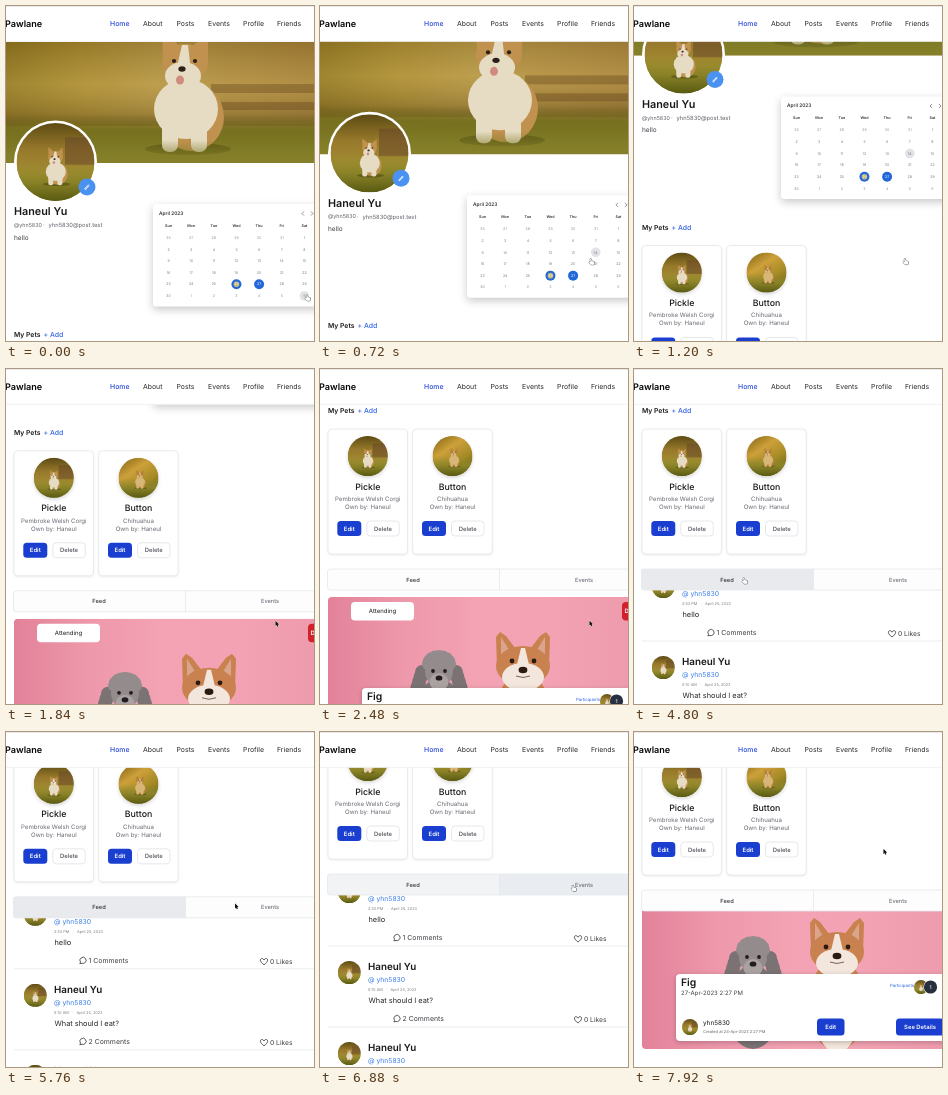
Animation, 308 px wide and 335 px high, one loop 8000 ms. Source, as an HTML page with a canvas:

```html
<!DOCTYPE html>
<html lang="en">
<head>
<meta charset="utf-8">
<title>Pet profile</title>
<style>
html, body { margin: 0; width: 100%; height: 100%; overflow: hidden; background: #fff; }
canvas { display: block; width: 308px; height: 335px; }
</style>
</head>
<body>
<canvas id="stage"></canvas>
<script>
const W = 308, H = 335, LOOP = 8000, STEP = 80;
const canvas = document.getElementById('stage');
const c = canvas.getContext('2d');
const dpr = Math.max(1, window.devicePixelRatio || 1);
canvas.width = W * dpr;
canvas.height = H * dpr;
c.textRendering = 'geometricPrecision';

const INK = '#18181b', GREY = '#5f6168', LINE = '#e5e7eb', BLUE = '#1a3fd0', LINK = '#2f62e8';
const USER = 'Haneul Yu', HANDLE = 'yhn5830';

// Eased value of [time, value] stops.
function track(t, stops) {
  if (t <= stops[0][0]) return stops[0][1];
  for (let i = 1; i < stops.length; i++) {
    const [t0, a] = stops[i - 1], [t1, b] = stops[i];
    if (t < t1) {
      const u = (t - t0) / (t1 - t0);
      return a + (b - a) * u * u * (3 - 2 * u);
    }
  }
  return stops[stops.length - 1][1];
}

function text(s, x, y, size, color = INK, weight = 400, align = 'left') {
  c.font = `${weight} ${size}px Inter, "Open Sans", sans-serif`;
  c.textAlign = align;
  c.textBaseline = 'middle';
  c.fillStyle = color;
  c.fillText(s, x, y);
}

function box(x, y, w, h, r, fill, stroke) {
  c.beginPath();
  c.roundRect(x, y, w, h, r);
  if (fill) { c.fillStyle = fill; c.fill(); }
  if (stroke) { c.strokeStyle = stroke; c.lineWidth = 0.8; c.stroke(); }
}

function shadowed(blur, dy, alpha, draw) {
  c.save();
  c.shadowColor = `rgba(0,0,0,${alpha})`;
  c.shadowBlur = blur * dpr;
  c.shadowOffsetY = dy * dpr;
  draw();
  c.restore();
}

function oval(x, y, rx, ry, fill, turn = 0) {
  c.beginPath();
  c.ellipse(x, y, rx, ry, turn, 0, Math.PI * 2);
  c.fillStyle = fill;
  c.fill();
}
const disc = (x, y, r, fill) => oval(x, y, r, r, fill);

function poly(fill, ...pts) {
  c.beginPath();
  pts.forEach(([x, y]) => c.lineTo(x, y));
  c.closePath();
  c.fillStyle = fill;
  c.fill();
}

function line(x0, y0, x1, y1, color, width = 0.8) {
  c.beginPath();
  c.moveTo(x0, y0);
  c.lineTo(x1, y1);
  c.strokeStyle = color;
  c.lineWidth = width;
  c.stroke();
}

function gradient(x0, y0, x1, y1, ...colors) {
  const g = c.createLinearGradient(x0, y0, x1, y1);
  colors.forEach((col, i) => g.addColorStop(i / (colors.length - 1), col));
  return g;
}

function clipped(path, draw) {
  c.save();
  c.beginPath();
  path();
  c.clip();
  draw();
  c.restore();
}

function button(label, x, y, w, h, solid) {
  box(x, y, w, h, 3.5, solid ? BLUE : '#fff', solid ? null : '#dfe1e6');
  text(label, x + w / 2, y + h / 2 + 0.3, 5.9, solid ? '#fff' : '#4b4d55', solid ? 600 : 500, 'center');
}

// Sitting dog, origin between its feet.
function sittingDog(x, y, s, coat = '#c0914f', chest = '#e6dcc4') {
  c.save();
  c.translate(x, y);
  c.scale(s, s);
  oval(6, -2, 43, 6, 'rgba(60,58,10,.45)');
  oval(10, -34, 32, 34, coat);
  oval(4, -42, 32, 30, chest);
  box(-20, -40, 16, 41, 7, chest);
  box(9, -40, 16, 41, 7, chest);
  poly(coat, [-19, -90], [-20, -120], [0, -103]);
  poly(coat, [8, -103], [26, -118], [26, -88]);
  oval(3, -88, 23, 19, coat);
  oval(1, -75, 18, 14, chest);
  poly(chest, [0, -106], [6, -106], [9, -80], [-6, -80]);
  disc(-8, -90, 2.1, '#2b2018');
  disc(13, -90, 2.1, '#2b2018');
  oval(0, -82, 3.6, 2.7, '#2b2018');
  oval(-2, -71, 4, 4.5, '#d08a80');
  c.restore();
}

function banner(y) {
  clipped(() => c.rect(0, y, W, 121), () => {
    c.fillStyle = gradient(0, 0, W, 0, '#8c7423', '#a88a35', '#b3954a', '#ad8a45', '#a5803f');
    c.fillRect(0, y, W, 121);
    c.fillStyle = gradient(0, y, 0, y + 84, 'rgba(110,84,12,.3)', 'rgba(215,185,90,.25)', 'rgba(95,72,20,.5)');
    c.fillRect(0, y, W, 84);
    c.fillStyle = 'rgba(92,62,24,.35)';
    c.fillRect(205, y + 42, 103, 9);
    c.fillRect(205, y + 60, 103, 8);
    c.fillStyle = gradient(0, y + 72, 0, y + 121, 'rgba(105,95,28,0)', '#77701f', '#7d7824', '#898329');
    c.fillRect(0, y + 72, W, 49);
    sittingDog(176, y + 109, 1);
    c.fillStyle = gradient(0, y + 98, 0, y + 121, 'rgba(125,120,36,0)', '#858029');
    c.fillRect(0, y + 98, W, 23);
  });
}

function photo(x, y, r, golden) {
  c.save();
  c.translate(x, y);
  c.scale(r / 41, r / 41);
  clipped(() => c.arc(0, 0, 41, 0, Math.PI * 2), () => {
    c.fillStyle = golden
      ? gradient(-30, -41, 25, 41, '#8a6a17', '#cda03a', '#a58a25', '#5c5a14')
      : gradient(0, -41, 0, 41, '#5d4b14', '#96782a', '#a58d35', '#6d6a17');
    c.fillRect(-41, -41, 82, 82);
    if (!golden) {
      c.fillStyle = 'rgba(105,72,40,.55)';
      c.fillRect(10, -26, 31, 29);
    }
    c.fillStyle = gradient(0, 0, 0, 41, 'rgba(150,140,40,0)', '#8b8328', '#595a12');
    c.fillRect(-41, 0, 82, 41);
    if (golden) sittingDog(2, 22, 0.32, '#b98238', '#d8b678');
    else sittingDog(-1, 24, 0.33);
  });
  c.restore();
}

function profile(y) {
  banner(36 + y);
  disc(49.5, 156 + y, 41.5, '#fff');
  photo(49.5, 156 + y, 39, false);
  disc(81, 181 + y, 8.5, '#4a92f2');
  line(78.8, 183.4 + y, 83, 179 + y, '#fff', 1.7);
  line(78.8, 183.4 + y, 83, 179 + y, '#4a92f2', 0.5);
  text(USER, 8, 206 + y, 10.8, INK, 600);
  text('@' + HANDLE, 8, 219.5 + y, 5.4, GREY);
  text('·', 37, 219.5 + y, 6, GREY);
  text(HANDLE + '@post.test', 42.5, 219.5 + y, 5.8, GREY);
  text('hello', 8, 232 + y, 6.5, '#3f4147');
}

function calendar(y, px, py) {
  shadowed(9, 3, 0.22, () => box(147, 198 + y, 175, 102.5, 3, '#fff'));
  text('April 2023', 153, 207.5 + y, 4.9, INK, 500);
  for (const [x, d] of [[297, -1], [306, 1]]) {
    line(x - d, 205.5 + y, x + d, 207.5 + y, '#444', 0.6);
    line(x + d, 207.5 + y, x - d, 209.5 + y, '#444', 0.6);
  }
  const left = 162.5, top = 231.7, dx = 22.65, dy = 11.65;
  const colX = i => left + i * dx, rowY = i => top + i * dy + y;
  ['Sun', 'Mon', 'Tue', 'Wed', 'Thu', 'Fri', 'Sat'].forEach((d, i) =>
    text(d, colX(i), 219.7 + y, 3.7, '#333', 600, 'center'));
  // The hovered day stays lit while the page scrolls beneath the pointer.
  disc(colX(Math.round((px - left) / dx)), rowY(Math.round((py - top) / dy)), 4.8, '#e2e3e6');
  for (let i = 0; i < 42; i++) {
    const x = colX(i % 7), ry = rowY(Math.floor(i / 7));
    const day = i < 6 ? 26 + i : i < 36 ? i - 5 : i - 35;
    const busy = i === 31 || i === 32;
    if (busy) {
      disc(x, ry, 5, '#2467d8');
      if (day === 26) disc(x, ry, 2.8, '#c2b775');
    }
    text(day, x, ry + 0.1, 3.6, busy ? '#fff' : i < 6 || i > 35 ? '#8d9096' : '#777a80', 400, 'center');
  }
}

function petCard(x, y, name, breed, golden) {
  shadowed(3, 1, 0.1, () => box(x, y, 79.5, 125, 4, '#fff'));
  box(x, y, 79.5, 125, 4, null, LINE);
  const mid = x + 39.8;
  shadowed(4, 2, 0.2, () => disc(mid, y + 27, 19.5, '#8a7a20'));
  photo(mid, y + 27, 20, golden);
  text(name, mid, y + 58, 8.8, INK, 500, 'center');
  text(breed, mid, y + 70, 6.1, '#686b73', 400, 'center');
  text('Own by: Haneul', mid, y + 78, 6.1, '#686b73', 400, 'center');
  button('Edit', x + 9.3, y + 92, 24, 15, true);
  button('Delete', x + 38.8, y + 92, 32.5, 15, false);
}

function pets(y) {
  text('My Pets', 8, 329 + y, 6.8, INK, 600);
  text('+ Add', 37.5, 329 + y, 6.9, LINK, 500);
  petCard(8, 347 + y, 'Pickle', 'Pembroke Welsh Corgi', false);
  petCard(92.7, 347 + y, 'Button', 'Chihuahua', true);
}

function poodle(x, y) {
  const fur = '#948b8c', dark = '#7b7274', light = '#aaa2a1';
  oval(x, y + 50, 27, 42, dark);
  for (let i = 0; i < 6; i++) {
    const dy = i * 5 + 1, out = 17 + i * 1.5;
    disc(x - out, y + dy, 7, dark);
    disc(x + out, y + dy, 7, dark);
  }
  for (let i = 0; i < 9; i++) {
    const a = Math.PI * (1 + i / 8);
    disc(x + Math.cos(a) * 11, y - 7 + Math.sin(a) * 8, 6, fur);
  }
  oval(x, y, 14, 16, fur);
  oval(x, y + 11, 9.5, 9, light);
  disc(x - 6, y, 1.9, '#201c20');
  disc(x + 6, y, 1.9, '#201c20');
  oval(x, y + 7, 3.4, 2.6, '#201c20');
}

function corgiFace(x, y) {
  const coat = '#c9814f', white = '#f3e6dc';
  oval(x, y + 52, 29, 46, coat);
  oval(x, y + 56, 23, 44, white);
  c.lineJoin = 'round';
  for (const d of [-1, 1]) {
    poly(coat, [x + d * 4, y - 14], [x + d * 17, y - 31], [x + d * 23, y - 35], [x + d * 27, y - 30], [x + d * 26, y]);
    poly('#dba48c', [x + d * 12, y - 14], [x + d * 22, y - 30], [x + d * 22, y - 6]);
  }
  oval(x, y - 1, 27, 20, coat);
  oval(x, y + 10, 21, 14, white);
  poly(white, [x - 2, y - 19], [x + 2, y - 19], [x + 8, y + 6], [x - 8, y + 6]);
  disc(x - 11, y - 6, 2.4, '#2a1a12');
  disc(x + 11, y - 6, 2.4, '#2a1a12');
  oval(x, y + 3, 4.4, 3.2, '#2a1a12');
  line(x - 7, y + 9, x, y + 10.5, '#5b4036');
  line(x, y + 10.5, x + 7, y + 9, '#5b4036');
}

function eventCard(y) {
  clipped(() => c.roundRect(8, y, 320, 166, 4), () => {
    c.fillStyle = gradient(8, 0, W, 0, '#e2829a', '#ee98ab', '#f3a3b3', '#f2a2b2', '#ee9cad');
    c.fillRect(8, y, W, 166);
    poodle(119, y + 74);
    corgiFace(203, y + 70);
  });
  box(31, y + 5, 63, 18.5, 4, '#fff');
  text('Attending', 62.5, y + 14.5, 6, INK, 400, 'center');
  box(302, y + 5, 40, 18.5, 4, '#d3212c');
  text('Delete', 304.5, y + 14.5, 6, '#fff', 600);

  const top = y + 91;
  shadowed(5, 1.5, 0.22, () => box(42, top, 290, 67, 4, '#fff'));
  text('Fig', 47, top + 9, 10.4, INK, 600);
  text('27-Apr-2023 2:27 PM', 47, top + 19.3, 6, '#3c3e44');
  text('Participants', 256, top + 11.7, 4.3, LINK);
  photo(287, top + 13, 7, false);
  disc(296.5, top + 13, 7.2, '#fff');
  disc(296.5, top + 13, 6.6, '#26303f');
  text('1', 296.5, top + 13.2, 5, '#fff', 500, 'center');
  photo(56, top + 53, 8, false);
  text(HANDLE, 69, top + 49.5, 6.4, INK);
  text('Created at 24-Apr-2023 2:27 PM', 69, top + 57.7, 4, '#62656c');
  button('Edit', 183, top + 44.5, 27.5, 17, true);
  button('See Details', 262, top + 44.5, 48, 17, true);
}

function post(y, time, message, comments) {
  line(8, y, W, y, LINE);
  photo(29.3, y + 26.5, 11.5, false);
  text(USER, 48, y + 21, 9.8, INK, 600);
  text('@ ' + HANDLE, 48, y + 34, 6.8, '#3b7de8');
  text(time + '   ·   April 25, 2023', 48, y + 44.3, 3.9, '#7b7e86');
  text(message, 48.5, y + 55, 7.4, '#26272b');
  c.strokeStyle = '#333';
  c.lineWidth = 0.8;
  c.beginPath();
  c.arc(77, y + 72.5, 3.1, 2.5, 2.5 + Math.PI * 1.8);
  c.lineTo(73.8, y + 75.8);
  c.closePath();
  c.stroke();
  text(comments + ' Comments', 82.5, y + 73, 6.9, '#3c3e44');
  const hx = 258, hy = y + 74;
  c.beginPath();
  c.moveTo(hx, hy + 3);
  c.bezierCurveTo(hx - 7, hy - 2, hx - 2, hy - 5.5, hx, hy - 1.8);
  c.bezierCurveTo(hx + 2, hy - 5.5, hx + 7, hy - 2, hx, hy + 3);
  c.stroke();
  text('0 Likes', 264, y + 74, 6.7, '#3c3e44');
}

function tabs(y, feedFill, eventsFill) {
  box(7.5, y, 320, 21, 3, '#fff');
  c.fillStyle = feedFill;
  c.fillRect(7.5, y, 172, 21);
  c.fillStyle = eventsFill;
  c.fillRect(179.5, y, 130, 21);
  box(7.5, y, 320, 21, 3, null, LINE);
  line(179.5, y, 179.5, y + 21, LINE);
  text('Feed', 93, y + 10.8, 5.7, '#2d2f35', 500, 'center');
  text('Events', 264, y + 10.8, 5.7, '#5a5d66', 400, 'center');
}

function nav() {
  c.fillStyle = '#fff';
  c.fillRect(0, 0, W, 35.5);
  line(0, 0.3, W, 0.3, '#dcdde0');
  line(0, 35.4, W, 35.4, '#eceef0');
  text('Pawlane', -1, 18, 9.1, '#050505', 600);
  const links = [['Home', 104], ['About', 137], ['Posts', 170.5], ['Events', 202], ['Profile', 237], ['Friends', 271]];
  links.forEach(([s, x], i) => text(s, x, 18, 6.9, i ? '#26272b' : '#2446d8', i ? 400 : 500));
}

function cursor(x, y, hand) {
  c.save();
  c.translate(x, y);
  c.lineJoin = 'round';
  c.lineWidth = 0.7;
  const shape = hand
    ? [[-0.8, -2], [0.4, -2], [0.7, 0], [3.4, 0.8], [3, 3.8], [0, 3.8], [-2, 1.4], [-1.3, 0.8], [-0.5, 1.2]]
    : [[-1.5, -2.5], [-1.5, 2.4], [-0.4, 1.5], [0.5, 3.2], [1.3, 2.8], [0.6, 1.2], [2, 1.1]];
  c.strokeStyle = hand ? '#222' : '#fff';
  poly(hand ? '#fff' : '#111', ...shape);
  c.stroke();
  c.fill();
  c.restore();
}

function draw(t) {
  const toFeed = 4640, toEvents = 7040;
  const feed = t >= toFeed && t < toEvents;
  const scroll = track(t, [[560, 0], [2100, 287], [5440, 287], [6000, 345], [7360, 345], [7840, 329]]);
  // Both tabs share one scrolling pane.
  const paneScroll = track(t, [[2560, 0], [3100, 35]]);
  const px = track(t, [[0, 301], [480, 271], [3100, 271], [3680, 260.5], [3920, 260.5], [4480, 110],
    [4800, 110], [5360, 230.5], [6000, 230.5], [6560, 253], [7120, 253], [7520, 251]]);
  const py = track(t, [[0, 291], [480, 255], [3100, 254], [3680, 150], [3920, 150], [4480, 211],
    [4800, 211], [5360, 174], [6000, 174], [6560, 155.5], [7120, 155.5], [7520, 119.5]]);

  c.setTransform(dpr, 0, 0, dpr, 0, 0);
  c.fillStyle = '#fff';
  c.fillRect(0, 0, W, H);

  if (scroll < 270) {
    profile(-scroll);
    calendar(-scroll, px, py);
  }
  pets(-scroll);

  const tabY = 487 - scroll;
  clipped(() => c.rect(0, tabY + 21, W, H), () => {
    if (feed) {
      const y = tabY + 26 - paneScroll;
      post(y, '2:53 PM', 'hello', 1);
      post(y + 81, '9:10 AM', 'What should I eat?', 2);
      post(y + 162, '9:08 AM', 'hello', 0);
    } else {
      eventCard(tabY + 28 - paneScroll);
    }
  });

  const onFeed = t >= 4400 && t < 4960, onEvents = t >= 6240 && t < 7280;
  const feedFill = onFeed || feed && !onEvents ? '#e8eaee' : feed ? '#f1f3f5' : '#fdfdfe';
  tabs(tabY, feedFill, onEvents ? '#e9ecf0' : '#fdfdfe');
  nav();
  cursor(px, py, t < 1280 || onFeed || onEvents);
}

const start = performance.now();
function frame() {
  const t = (performance.now() - start) % LOOP;
  draw(Math.floor(t / STEP) * STEP);
  requestAnimationFrame(frame);
}
frame();
</script>
</body>
</html>
```
